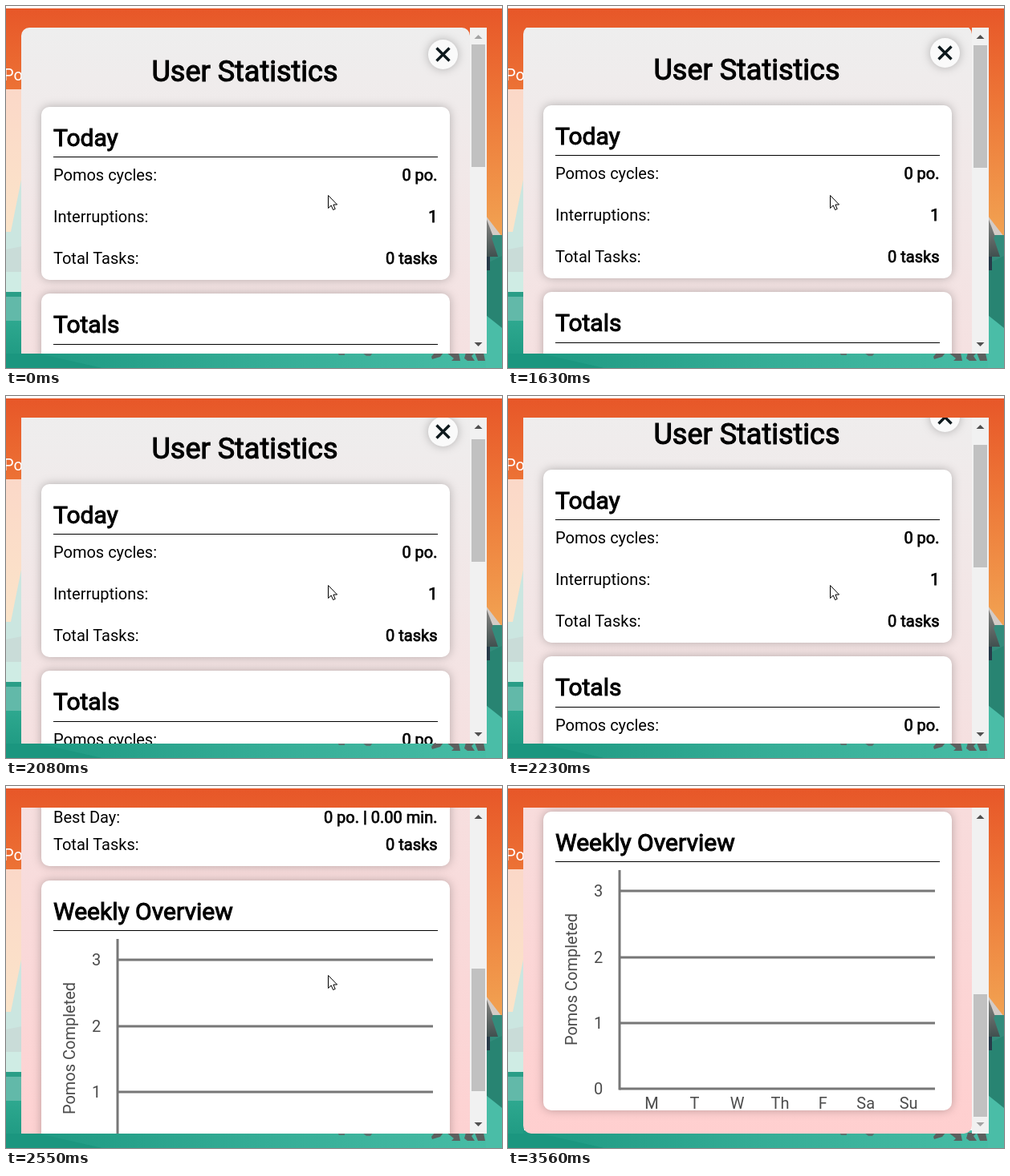
An HTML page for the animation above (4420 ms loop, 618 by 452 pixels).

```html
<!DOCTYPE html>
<html lang="en">
<head>
<meta charset="utf-8">
<title>User Statistics</title>
<style>
html, body { margin: 0; width: 100%; height: 100%; overflow: hidden; }
svg { display: block; width: 618px; height: 452px; }
text { font-family: Roboto, sans-serif; font-size: 20px; white-space: pre; }
.bold { stroke: #000; stroke-width: .75px; }
.head { font-size: 30px; stroke: #000; stroke-width: 1px; }
.title { font-size: 36px; stroke: #000; stroke-width: 1.12px; }
.card { fill: #fff; filter: drop-shadow(0 0 6px rgba(0, 0, 0, .26)); }
.axis { fill: none; stroke: #777; stroke-width: 3; }
.chart text { fill: #4c4c4c; }
</style>
</head>
<body>
<svg viewBox="0 0 618 452">
  <defs>
    <linearGradient id="sky" x2="0" y2="1">
      <stop stop-color="#e75628"/><stop offset=".4" stop-color="#ed7637"/><stop offset="1" stop-color="#f2a654"/>
    </linearGradient>
    <linearGradient id="haze" x2="0" y2="1">
      <stop stop-color="#fbd8c8"/><stop offset="1" stop-color="#fbe5c9"/>
    </linearGradient>
    <linearGradient id="field" x2="0" y2="1">
      <stop stop-color="#2ea88f"/><stop offset="1" stop-color="#1b967f"/>
    </linearGradient>
    <linearGradient id="grass">
      <stop stop-color="#1c9881"/><stop offset=".5" stop-color="#35ad96"/><stop offset="1" stop-color="#48bda6"/>
    </linearGradient>
    <linearGradient id="tree" x2="0" y2="1">
      <stop stop-color="#8b8784"/><stop offset="1" stop-color="#40504f"/>
    </linearGradient>
    <linearGradient id="paper" x2="0" y2="1">
      <stop stop-color="#eee"/><stop offset="1" stop-color="#ffcfcf"/>
    </linearGradient>
    <clipPath id="view"><path d="M19 27H578V434H19Z"/></clipPath>
  </defs>

  <!-- landscape -->
  <path fill="url(#sky)" d="M0 0H618V300H0Z"/>
  <path fill="#fff" d="M0 0H618V3H0Z"/>
  <path fill="url(#haze)" d="M0 104H20V300H0Z"/>
  <path fill="#cbe6e0" d="M20 212L6 282H0V357H20Z"/>
  <path fill="#c9dcd8" d="M0 304L20 300V332H0Z"/>
  <path fill="#cfece4" d="M0 332H20V357H0Z"/>
  <path fill="#2a9e87" d="M0 357H20V363H0Z"/>
  <path fill="#62b9a9" d="M0 363H20V393H0Z"/>
  <path fill="url(#field)" d="M0 393H20V452H0Z"/>
  <path fill="url(#grass)" d="M19 430H618V452H19Z"/>
  <path fill="#1b967f" d="M0 434H40L120 452H0Z"/>
  <path fill="#d3cbc6" d="M598 262L618 288H598Z"/>
  <path fill="#338b7b" d="M598 286H618V440H598Z"/>
  <path fill="#288472" d="M598 322L618 312V414L598 392Z"/>
  <path fill="#4abda7" d="M598 386L618 402V452H598Z"/>
  <path fill="url(#tree)" d="M598 264L607 288L605 289L613 313H598Z"/>
  <path fill="#263a48" d="M598 313H603V330H598Z"/>
  <path fill="#5d7370" d="M413 433H422V436H415ZM444 433H457L454 437H449Z"/>
  <path fill="#5c5f5e" d="M534 433H545L541 438L531 441L530 438ZM549 433H564L566 443H555L558 440L553 436ZM573 433H584L580 437L584 443H575L571 440ZM584 433H595L597 443H588Z"/>
  <text x="-3" y="93" fill="#fff">Po</text>

  <!-- scrolling panel -->
  <g clip-path="url(#view)">
    <g id="page">
      <rect x="19" y="27" width="559" height="968" rx="10" fill="url(#paper)"/>
      <text class="title" x="297.5" y="94" text-anchor="middle">User Statistics</text>
      <circle class="card" cx="544.5" cy="60.5" r="18.5" style="fill:#fafafa"/>
      <path d="M536.5 52.5L552.5 68.5M552.5 52.5L536.5 68.5" stroke="#0e191d" stroke-width="3.4"/>
    </g>
  </g>

  <!-- scrollbar -->
  <path fill="#f1f1f1" d="M578 27H599V434H578Z"/>
  <rect id="thumb" x="580" width="17" height="153" fill="#c1c1c1"/>
  <path id="up" d="M583.5 41H593.5L588.5 36Z"/>
  <path id="down" d="M583.5 420H593.5L588.5 425Z"/>

  <circle id="glow" cx="401" cy="236" r="15" fill="#fdfd80"/>
  <path id="cursor" d="M.5 .5V16.5L4.2 13L6.6 18.5L9.2 17.4L6.9 12H11.6Z" fill="#fff" stroke="#000"/>
</svg>
<script>
const LOOP = 4420, MAX = 561;
const $ = id => document.getElementById(id);
const page = $('page');

function add(parent, tag, attrs, label) {
  const el = document.createElementNS('http://www.w3.org/2000/svg', tag);
  for (const k in attrs) el.setAttribute(k, attrs[k]);
  if (label) el.textContent = label;
  parent.appendChild(el);
  return el;
}

function card(top, height, rule, name, rows = []) {
  add(page, 'rect', { class: 'card', x: 44, y: top, width: 509, height, rx: 10 });
  add(page, 'text', { class: 'head', x: 59, y: top + 49 }, name);
  add(page, 'rect', { x: 59, y: top + rule, width: 479, height: 1 });
  for (const [y, label, value] of rows) {
    add(page, 'text', { x: 59, y }, label);
    add(page, 'text', { class: 'bold', x: 537.5, y, 'text-anchor': 'end' }, value);
  }
}

card(126, 216, 62, 'Today', [
  [218, 'Pomos cycles:', '0 po.'],
  [270, 'Interruptions:', '1'],
  [322, 'Total Tasks:', '0 tasks']
]);
card(359, 216, 63, 'Totals', [
  [452, 'Pomos cycles:', '0 po.'],
  [486, 'Avg. Interruptions:', '1.00 per po.'],
  [521, 'Best Day:', '0 po. | 0.00 min.'],
  [555, 'Total Tasks:', '0 tasks']
]);
card(593, 373, 62, 'Weekly Overview');

const chart = add(page, 'g', { class: 'chart', transform: `translate(0 ${MAX})` });
const middle = { 'text-anchor': 'middle' };
add(chart, 'path', { class: 'axis', d: 'M139 105V379.5' });
for (let n = 0; n < 4; n++) {
  const y = Math.round(378.3 - n * 82.4);
  add(chart, 'path', { class: 'axis', d: `M139 ${y}H532` });
  add(chart, 'text', { ...middle, x: 112.5, y: y + 7 }, String(n));
}
['M', 'T', 'W', 'Th', 'F', 'Sa', 'Su'].forEach((day, i) =>
  add(chart, 'text', { ...middle, x: 179 + i * 53.35, y: 403 }, day));
add(chart, 'text', { ...middle, transform: 'translate(86 241.5) rotate(-90)' }, 'Pomos Completed');

// [time, scroll offset]
const scrolls = [
  [0, 0], [1630, 2], [1690, 6], [1770, 10], [1850, 13],
  [2080, 16], [2160, 34], [2240, 100], [2320, 200], [2400, 304],
  [2470, 395], [2550, 475], [2630, 535], [2700, MAX]
];
const moves = [3100, 3180, 3260, 3330, 3410, 3490, 3560];

function draw(t) {
  const y = scrolls.filter(s => s[0] <= t).pop()[1];
  page.setAttribute('transform', `translate(0 ${-y})`);
  $('thumb').setAttribute('y', Math.round(48 + y * 212 / MAX));
  $('up').setAttribute('fill', y > 0 ? '#505050' : '#a3a3a3');
  $('down').setAttribute('fill', y < MAX ? '#505050' : '#a3a3a3');
  $('glow').style.display = t >= 1070 && t < 1160 ? '' : 'none';

  const step = moves.filter(m => m <= t).length;
  const p = (step / 6) ** 1.5;
  $('cursor').style.display = step < 7 ? '' : 'none';
  $('cursor').setAttribute('transform',
    `translate(${Math.round(401 + 193 * p)} ${Math.round(236 + 204 * p)})`);
}

const start = performance.now();
function tick() {
  draw((performance.now() - start) % LOOP);
  requestAnimationFrame(tick);
}
tick();
</script>
</body>
</html>
```
